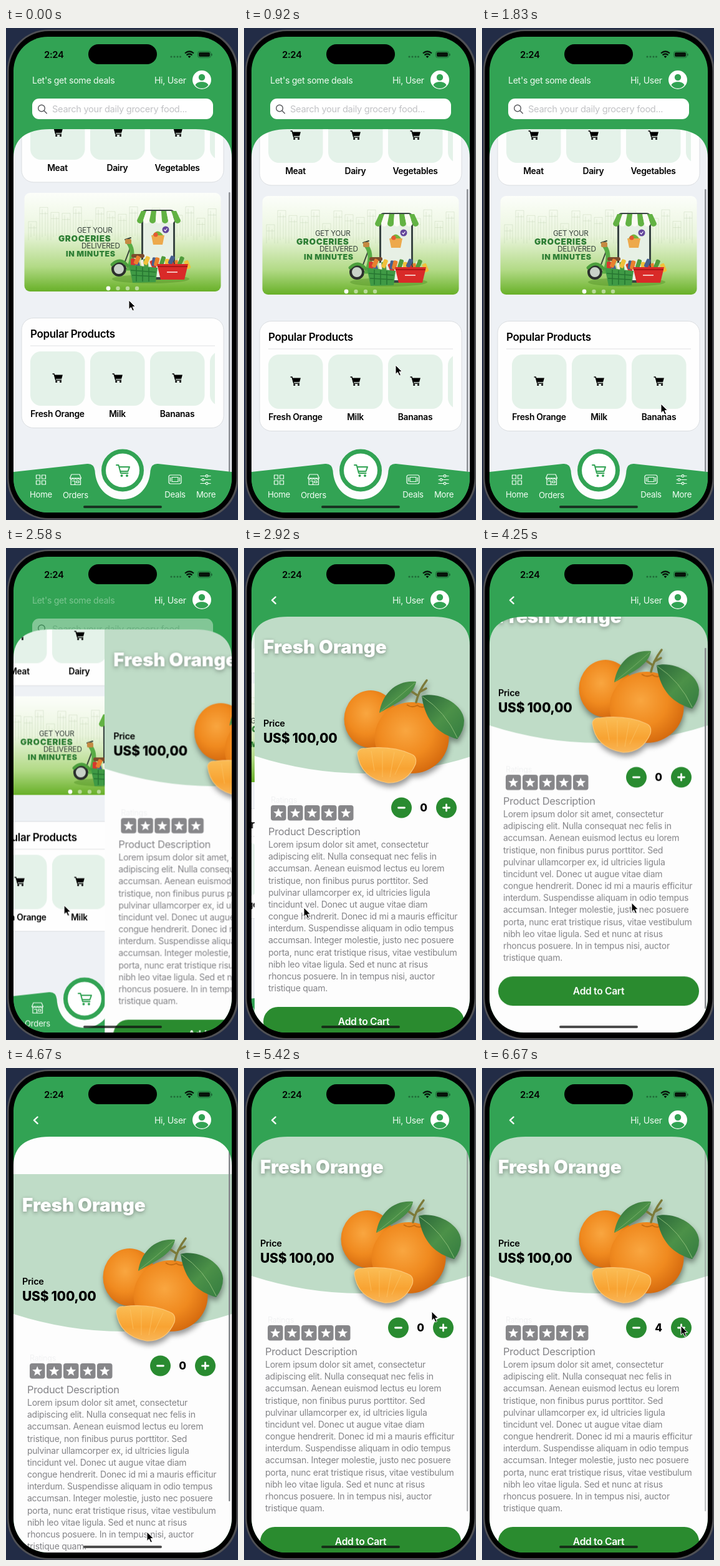
An HTML page for the animation above (6.75 s loop, 372 by 788 pixels).

```html
<!DOCTYPE html>
<html lang="en">
<head>
<meta charset="utf-8">
<title>Grocery app</title>
<style>
html, body { margin: 0; width: 100%; height: 100%; overflow: hidden; background: #222c46; }
svg { display: block; width: 372px; height: 788px; }
text { font-family: Inter, "Liberation Sans", sans-serif; letter-spacing: -.02em; white-space: pre; }
.mid { text-anchor: middle; }
.semi { font-weight: 600; }
.heavy { font-weight: 800; letter-spacing: -.012em; }
.label { font-size: 13.8px; font-weight: 600; text-anchor: middle; }
.tab { font-size: 13.2px; fill: #f4fff6; text-anchor: middle; }
.slogan { font-weight: 900; letter-spacing: .045em; }
.line { fill: none; stroke: #f4fff6; stroke-width: 1.2; stroke-linecap: round; stroke-linejoin: round; }
.title { font-weight: 900; letter-spacing: 0; filter: drop-shadow(0 2px 3px rgba(0, 0, 0, .35)); }
.fruit { filter: drop-shadow(1px 6px 4px rgba(0, 0, 0, .4)); }
#copy text { letter-spacing: -.0175em; }

.sheet, .home, .nav, .detail, .settle, .row, .page, .homebar, .pagebar, .hello, .back, .cursor {
  animation: 6750ms ease-in-out infinite;
}
.sheet { animation-name: sheet; }
.home { animation-name: home; }
.nav { animation-name: nav; }
.detail { animation-name: detail; }
.settle { animation-name: settle; }
.row { animation-name: row; }
.page { animation-name: page; }
.homebar { animation-name: homebar; }
.pagebar { animation-name: pagebar; }
.hello { animation-name: hello; }
.back { animation-name: back; }
.cursor { animation-name: cursor; }
.count { animation: count 6750ms step-end infinite; }

@keyframes settle {
  0%, 5% { transform: none; animation-timing-function: ease-out; }
  13%, 100% { transform: translateY(5px); }
}
@keyframes homebar {
  0%, 5% { transform: none; opacity: 1; }
  13%, 27.2% { transform: translateY(-5px); opacity: 1; }
  32%, 100% { transform: translateY(-5px); opacity: 0; }
}
@keyframes row {
  0%, 22% { transform: none; }
  26.5%, 27.8% { transform: translateX(9px); animation-timing-function: ease-out; }
  32.5%, 100% { transform: none; }
}
@keyframes sheet {
  0%, 36.6% { transform: none; animation-timing-function: cubic-bezier(.22, .55, .3, 1); }
  43%, 100% { transform: translateY(-52px); }
}
@keyframes nav {
  0%, 36.6% { transform: none; animation-timing-function: cubic-bezier(.22, .55, .3, 1); }
  43%, 100% { transform: translateY(74px); }
}
@keyframes home {
  0%, 36.6% { transform: none; animation-timing-function: cubic-bezier(.22, .55, .3, 1); }
  43.259% { transform: translateX(-103.5px); }
  44.44%, 100% { transform: translateX(-105px); }
}
@keyframes detail {
  0%, 36.6% { transform: translateX(350px); animation-timing-function: cubic-bezier(.22, .55, .3, 1); }
  43.259% { transform: translateX(5px); }
  44.44%, 100% { transform: none; }
}
@keyframes hello { 0%, 36.6% { opacity: 1; } 39.5%, 100% { opacity: 0; } }
@keyframes back { 0%, 37.5% { opacity: 0; } 42%, 100% { opacity: 1; } }
@keyframes page {
  0%, 49% { transform: none; }
  54.8%, 62.8% { transform: translateY(-49px); }
  69.185%, 70.2% { transform: translateY(61px); animation-timing-function: cubic-bezier(.22, .55, .3, 1); }
  77.5%, 100% { transform: none; }
}
@keyframes pagebar {
  0%, 49% { transform: none; opacity: 0; }
  50% { opacity: 1; }
  54.8%, 62.8% { transform: translateY(28px); opacity: 1; }
  69.185%, 70.2% { transform: translateY(-16px); opacity: 1; }
  77.5% { transform: none; opacity: 1; }
  82%, 100% { transform: none; opacity: .5; }
}
@keyframes count {
  0% { transform: none; }
  86.5% { transform: translateY(-40px); }
  89.6% { transform: translateY(-80px); }
  92.7% { transform: translateY(-120px); }
  95.8%, 100% { transform: translateY(-160px); }
}
@keyframes cursor {
  0%, 5% { transform: translate(197px, 436px); }
  20%, 22% { transform: translate(270px, 601px); }
  26.5%, 27.8% { transform: translate(287px, 602px); }
  34%, 37% { transform: translate(93px, 572px); }
  43.259% { transform: translate(96px, 576px); }
  49% { transform: translate(252px, 548px); }
  54.8%, 57% { transform: translate(257px, 496px); }
  62.8% { transform: translate(240px, 568px); }
  69.185%, 70.5% { transform: translate(226px, 743px); }
  80.296% { transform: translate(301px, 390px); }
  84.5%, 100% { transform: translate(319px, 413px); }
}
</style>
</head>
<body>
<svg viewBox="0 0 372 788">
  <defs>
    <clipPath id="screen"><rect x="12" y="14" width="350" height="762" rx="55"/></clipPath>
    <clipPath id="top"><path d="M12 840V208C12 178 32 162 70 162H304C342 162 362 178 362 208V840z"/></clipPath>
    <clipPath id="shelf"><rect x="39" y="60" width="296" height="600"/></clipPath>
    <clipPath id="digit"><rect x="266" y="402" width="34" height="28"/></clipPath>
    <clipPath id="card"><rect x="29.5" y="264" width="315" height="158" rx="9"/></clipPath>
    <linearGradient id="meadow" x2="0" y2="1">
      <stop stop-color="#fcfefa"/><stop offset=".4" stop-color="#eaf5dd"/>
      <stop offset=".75" stop-color="#b2da86"/><stop offset="1" stop-color="#68b028"/>
    </linearGradient>
    <linearGradient id="notch" x2="0" y2="1">
      <stop stop-color="#eef1f5"/><stop offset=".5" stop-color="#fcfdfd"/>
    </linearGradient>
    <radialGradient id="peel" cx=".42" cy=".4" r=".66">
      <stop stop-color="#f9a640"/><stop offset=".55" stop-color="#f08a1f"/><stop offset="1" stop-color="#d2660c"/>
    </radialGradient>
    <linearGradient id="pulp" x2="0" y2="1">
      <stop stop-color="#fbbd55"/><stop offset=".6" stop-color="#f8a332"/><stop offset="1" stop-color="#f9b658"/>
    </linearGradient>
    <linearGradient id="leaf" x2="1" y2="1">
      <stop stop-color="#2a6638"/><stop offset=".5" stop-color="#4c9148"/><stop offset="1" stop-color="#347c40"/>
    </linearGradient>
    <g id="cart">
      <path d="M-8-6.6h2.5L-2.7 3.6H6.6" fill="none" stroke="#000" stroke-width="1.5"/>
      <path d="M-5.2-5H8.4L6.6 1.4H-3.6z"/>
      <circle cx="-1.8" cy="6" r="1.6"/><circle cx="5" cy="6" r="1.6"/>
    </g>
    <path id="star" d="M0-8.4L2.1-2.7 8.1-2.5 3.4 1.2 5 7 0 3.6-5 7-3.4 1.2-8.1-2.5-2.1-2.7z"/>
  </defs>

  <rect width="372" height="788" fill="#222c46"/>
  <rect x="2" y="2.5" width="370.5" height="785" rx="66" fill="#505155"/>
  <rect x="4.5" y="5" width="365" height="780" rx="64"/>

  <g clip-path="url(#screen)">
    <rect x="12" y="14" width="350" height="762" fill="#32a354"/>

    <g class="hello">
      <text x="42" y="88.5" font-size="14.1" fill="#f0fbf2">Let's get some deals</text>
      <rect x="42" y="113" width="290" height="33" rx="11" fill="#fff"/>
      <g fill="none" stroke="#55565a" stroke-width="1.4" stroke-linecap="round">
        <circle cx="57" cy="128.5" r="5.3"/><path d="M61 132.5l4.3 4.3"/>
      </g>
      <text x="74" y="135" font-size="14.6" fill="#c1c2c5">Search your daily grocery food...</text>
    </g>
    <path class="back" d="M50.5 78.5l-5.5 5.2 5.5 5.2" fill="none" stroke="#fff" stroke-width="2.4" stroke-linecap="round" stroke-linejoin="round"/>
    <text x="238" y="88.5" font-size="14" fill="#f0fbf2">Hi, User</text>
    <circle cx="314" cy="83" r="15" fill="#fff"/>
    <circle cx="314" cy="79" r="5.2" fill="#32a354"/>
    <path d="M303.5 91.5C306 84.5 322 84.5 324.5 91.5A13 13 0 0 1 303.5 91.5z" fill="#32a354"/>

    <g class="sheet" clip-path="url(#top)">
      <g class="home">
        <rect x="12" y="162" width="460" height="680" fill="#eef1f5"/>
        <g class="settle">
          <g fill="#fefefe" stroke="#dadde0">
            <rect x="25" y="71" width="324" height="176" rx="19"/>
            <rect x="25" y="464.5" width="324" height="176" rx="19"/>
          </g>
          <g clip-path="url(#shelf)"><g id="groups"></g></g>

          <g clip-path="url(#card)">
            <rect x="29" y="264" width="316" height="158" fill="url(#meadow)"/>
            <path id="city" fill="none" stroke="#a9bd98" stroke-width=".7" opacity=".4"/>
            <g fill="#35403a">
              <text x="114" y="328" font-size="11.5">GET YOUR</text>
              <text x="121" y="353" font-size="11.8">DELIVERED</text>
            </g>
            <g fill="#2f7f35">
              <text class="slogan" x="84" y="341.5" font-size="13.6">GROCERIES</text>
              <text class="slogan" x="96" y="365.5" font-size="12.4">IN MINUTES</text>
            </g>
            <ellipse cx="232" cy="402" rx="62" ry="7" fill="#4a8a20" opacity=".4"/>
            <rect x="217" y="291" width="54" height="112" rx="7" fill="#394543"/>
            <rect x="220" y="295" width="48" height="104" rx="4" fill="#e7f0e5"/>
            <path d="M233 332h21l-3 15h-15z" fill="#eda94c"/>
            <path d="M235 332q8-13 17 0" fill="#75b43c"/>
            <circle cx="240" cy="331" r="3.5" fill="#e55a32"/>
            <circle cx="256" cy="323" r="5.5" fill="#63469b"/>
            <path d="M253.5 323l2 2 3-4" fill="none" stroke="#fff" stroke-width="1.2"/>
            <g id="awning"></g>
            <g fill="none" stroke-linecap="round">
              <circle cx="181" cy="386" r="10" fill="#c9d2c8" stroke="#2b2f2c" stroke-width="4"/>
              <path d="M191 339l9-3M196 338l4 12-11 29" stroke="#39453b" stroke-width="2"/>
              <path d="M197 345q10 14 0 40h16" stroke="#58ac45" stroke-width="7"/>
              <path d="M170 379q13-13 25 2" stroke="#4c9f3d" stroke-width="5"/>
            </g>
            <rect x="191" y="338" width="10" height="8" rx="2" fill="#c58a42"/>
            <rect x="201" y="362" width="21" height="6" rx="3" fill="#7a4b2c"/>
            <g id="goods"></g>
            <path d="M197 379l46 5-3 23-37 1z" fill="#3f9a45"/>
            <path d="M200 388l40 3M202 396l37 2M209 382v24M219 383v23M229 384v22" stroke="#267531" stroke-width="1.5"/>
            <path d="M242 378h50l-6 25h-38z" fill="#d92a28"/>
            <path d="M243 382h48" stroke="#a91718" stroke-width="2"/>
            <path d="M258 391h17" stroke="#f3c1bd" stroke-width="2"/>
            <g fill="#fff">
              <circle cx="164" cy="417" r="3.4"/>
              <g opacity=".5"><circle cx="179.5" cy="417" r="3.2"/><circle cx="195" cy="417" r="3.2"/><circle cx="210" cy="417" r="3.2"/></g>
            </g>
          </g>

          <text x="39" y="495.5" font-size="17" class="semi">Popular Products</text>
          <path d="M39 509h296" stroke="#dfe1e3"/>
        </g>
        <rect class="homebar" x="357" y="263" width="2.5" height="453" rx="1.2" fill="#8d9096"/>

        <g class="nav">
          <path d="M143 700H231V712A44 44 0 0 1 143 712z" fill="url(#notch)"/>
          <path d="M12 711L130 698Q141 697 142.5 709C144 735 161 755 187 755S230 735 231.5 709Q233 697 244 698L362 711V850H12z" fill="#32a354"/>
          <circle cx="187" cy="708.5" r="30.5" fill="#fff" stroke="#32a354" stroke-width="7"/>
          <g fill="none" stroke="#32a354" stroke-width="2" stroke-linejoin="round" stroke-linecap="round">
            <path d="M177 700h3.5l3.5 13h11.5M181.5 703H198l-2.5 7H183.5"/>
            <circle cx="185.5" cy="717" r="1"/><circle cx="194" cy="717" r="1"/>
          </g>
          <g class="line">
            <path d="M48.5 716h6v6h-6zM57.5 716h6v6h-6zM48.5 725h6v6h-6zM57.5 725h6v6h-6z"/>
            <path d="M105 715h13l2.5 6h-18zM104 723v8.5h15.5V723M106.5 725.5h4v6M113 725.5h4v3h-4zM102.5 721q2.2 4 4.5 0 2.2 4 4.5 0 2.2 4 4.5 0 2.2 4 4.5 0"/>
            <path d="M264 716h14q3 0 3 3v8q0 3-3 3h-14q-3 0-3-3v-8q0-3 3-3zM266 719.5h10v7h-10zM263.5 720v6M278.5 720v6"/>
            <path d="M312 717.5h8M324 717.5h4M312 723.5h2M318 723.5h10M312 729.5h8M324 729.5h4"/>
            <circle cx="322" cy="717.5" r="1.8"/><circle cx="316" cy="723.5" r="1.8"/><circle cx="322" cy="729.5" r="1.8"/>
          </g>
          <text class="tab" x="56" y="752">Home</text>
          <text class="tab" x="111.5" y="753">Orders</text>
          <text class="tab" x="271" y="751.5">Deals</text>
          <text class="tab" x="320.5" y="751.5">More</text>
        </g>
      </g>

      <g class="detail"><g transform="translate(0 52)">
        <rect x="12" y="100" width="350" height="700" fill="#fdfdfd"/>
        <g class="page">
          <path d="M12 109H362V333Q187 389 12 333z" fill="#bfdcc7"/>
          <text class="title" x="26" y="169" font-size="29.5" fill="#fff">Fresh Orange</text>
          <text class="semi" x="26" y="285.5" font-size="14.5">Price</text>
          <text class="heavy" x="26" y="312" font-size="21">US$ 100,00</text>

          <g class="fruit">
            <ellipse cx="198" cy="274" rx="42.5" ry="46" fill="url(#peel)"/>
            <ellipse cx="264" cy="304" rx="59.5" ry="57" fill="url(#peel)"/>
            <path d="M256 251q8 6 17 1 6 5 15 1" fill="none" stroke="#c56c12" stroke-width="2"/>
            <path d="M271 247q4-18 17-35M273 236l-9-6M276 231l11-6" fill="none" stroke="#7c7a3a" stroke-width="3.5" stroke-linecap="round"/>
            <path d="M212 264C217 232 240 211 271 214C267 236 243 247 212 264z" fill="url(#leaf)"/>
            <path d="M214 262Q242 240 269 216" fill="none" stroke="#77ad68"/>
            <path d="M280 237C302 230 345 246 348 276Q348 292 337 306C308 298 286 280 280 237z" fill="url(#leaf)"/>
            <path d="M281 238Q318 262 337 304" fill="none" stroke="#8bbd77"/>
            <path d="M177 329Q179 320 189 321Q232 316 263 330Q273 334 270 346Q257 377 225 376Q181 368 177 329z" fill="url(#pulp)" stroke="#fcc675" stroke-width="1.2"/>
            <path d="M199 325l5 32M217 325v42M236 327l-7 40M252 331l-15 32" fill="none" stroke="#fbc569" opacity=".7"/>
          </g>

          <text x="38" y="408" font-size="12.5" fill="#f1f2f3">Ratings</text>
          <g id="stars"></g>
          <g fill="#298b30"><circle cx="247.5" cy="416" r="16.5"/><circle cx="319.5" cy="416" r="16.5"/></g>
          <path d="M242.5 416h10M314.5 416h10M319.5 411v10" stroke="#fff" stroke-width="2.8" stroke-linecap="round"/>
          <g clip-path="url(#digit)"><g class="count" id="digits"></g></g>
          <g fill="#838387">
            <text x="34" y="460" font-size="16.4">Product Description</text>
            <g id="copy" font-size="14"></g>
          </g>
          <rect x="26" y="735" width="322" height="47" rx="23.5" fill="#2a8b2f"/>
          <text class="semi mid" x="187" y="763.5" font-size="15.6" fill="#fff">Add to Cart</text>
        </g>
        <rect class="pagebar" x="357" y="132" width="2.5" height="578" rx="1.2" fill="#85888c"/>
      </g></g>
    </g>

    <text class="semi" x="61" y="47.5" font-size="14.8">2:24</text>
    <rect x="132" y="26" width="110" height="32" rx="16"/>
    <g fill="#1f6b38"><circle cx="265" cy="46" r="1.5"/><circle cx="270" cy="46" r="1.5"/><circle cx="275" cy="46" r="1.5"/><circle cx="279.5" cy="46" r="1.5"/></g>
    <path d="M287 40.5q7-6 14 0M289.5 43.5q4.5-4 9 0" fill="none" stroke="#07150b" stroke-width="2.2"/>
    <path d="M291.7 45.5q2.3-2 4.6 0L294 48z"/>
    <rect x="307.5" y="37.5" width="21" height="10" rx="3.2" fill="none" stroke="#1d6535"/>
    <rect x="309" y="39" width="18" height="7" rx="2" fill="#07150b"/>
    <path d="M330 41v3.5" stroke="#1d6535" stroke-width="1.5"/>
    <rect x="124" y="765" width="126" height="4" rx="2" fill="#111" opacity=".75"/>
  </g>

  <path class="cursor" d="M0 0V14.5L3.4 11.4 5.9 17 8.4 15.9 6 10.5H10.6z" stroke="#fff"/>
</svg>
<script>
const fill = (id, items, draw) => {
  document.getElementById(id).innerHTML = items.map(draw).join("");
};
const range = n => [...Array(n).keys()];

const tiles = (names, y) => names.map((name, i) => {
  const x = 39 + 96 * i;
  return `<rect x="${x}" y="${y}" width="87.5" height="87" rx="17" fill="#e4f2e9"/>
    <use href="#cart" x="${x + 43.5}" y="${y + 42.5}"/>
    <text class="label" x="${x + 43.5}" y="${y + 105}">${name}</text>`;
}).join("");

fill("groups", [
  ["", ["Meat", "Dairy", "Vegetables", "Fruits"], 124],
  ["row", ["Fresh Orange", "Milk", "Bananas", "Strawberry"], 518]
], ([cls, names, y]) => `<g class="${cls}">${tiles(names, y)}</g>`);

fill("stars", range(5), i =>
  `<rect x="${38 + 27 * i}" y="412" width="24.5" height="24.5" rx="4" fill="#87878a"/>
   <use href="#star" x="${50.2 + 27 * i}" y="424.8" fill="#fff"/>`);

fill("digits", range(5), i =>
  `<text class="heavy mid" x="283" y="${422 + 40 * i}" font-size="17">${i}</text>`);

fill("copy", `Lorem ipsum dolor sit amet, consectetur
adipiscing elit. Nulla consequat nec felis in
accumsan. Aenean euismod lectus eu lorem
tristique, non finibus purus porttitor. Sed
pulvinar ullamcorper ex, id ultricies ligula
tincidunt vel. Donec ut augue vitae diam
congue hendrerit. Donec id mi a mauris efficitur
interdum. Suspendisse aliquam in odio tempus
accumsan. Integer molestie, justo nec posuere
porta, nunc erat tristique risus, vitae vestibulum
nibh leo vitae ligula. Sed et nunc at risus
rhoncus posuere. In in tempus nisi, auctor
tristique quam.`.split("\n"), (line, i) =>
  `<text x="34" y="${480 + 19.17 * i}">${line}</text>`);

fill("awning", range(7), i => {
  const a = 217 + 8 * i, b = 210 + 10 * i;
  return `<path d="M${a} 293h8L${b + 10} 308a5 5 0 0 1-10 0z" fill="${i % 2 ? "#fbfbf3" : "#62b243"}"/>`;
});

// Groceries piled above the two baskets
const hues = ["#d8382e", "#f0c13b", "#4f9b3c", "#f4efe2", "#e9802d", "#46608f"];
fill("goods", range(18), i => {
  const x = 200 + 5 * i, y = 369 + 5 * Math.sin(i * 2.3);
  return `<rect x="${x}" y="${y}" width="7" height="14" rx="2" fill="${hues[i * 5 % 6]}" transform="rotate(${Math.sin(i * 4) * 25} ${x} ${y})"/>`;
});

// Sketched skyline
const skyline = range(17).map(i => {
  const x = 36 + 18 * i, h = 30 + 24 * Math.abs(Math.sin(i * 1.9));
  return `M${x} 340v${-h}h13v${h}M${x + 4} ${343 - h}v${h - 8}M${x + 9} ${347 - h}v${h - 14}M${x} ${350 - h}h13`;
});
document.getElementById("city").setAttribute("d", skyline.join(""));
</script>
</body>
</html>
```
